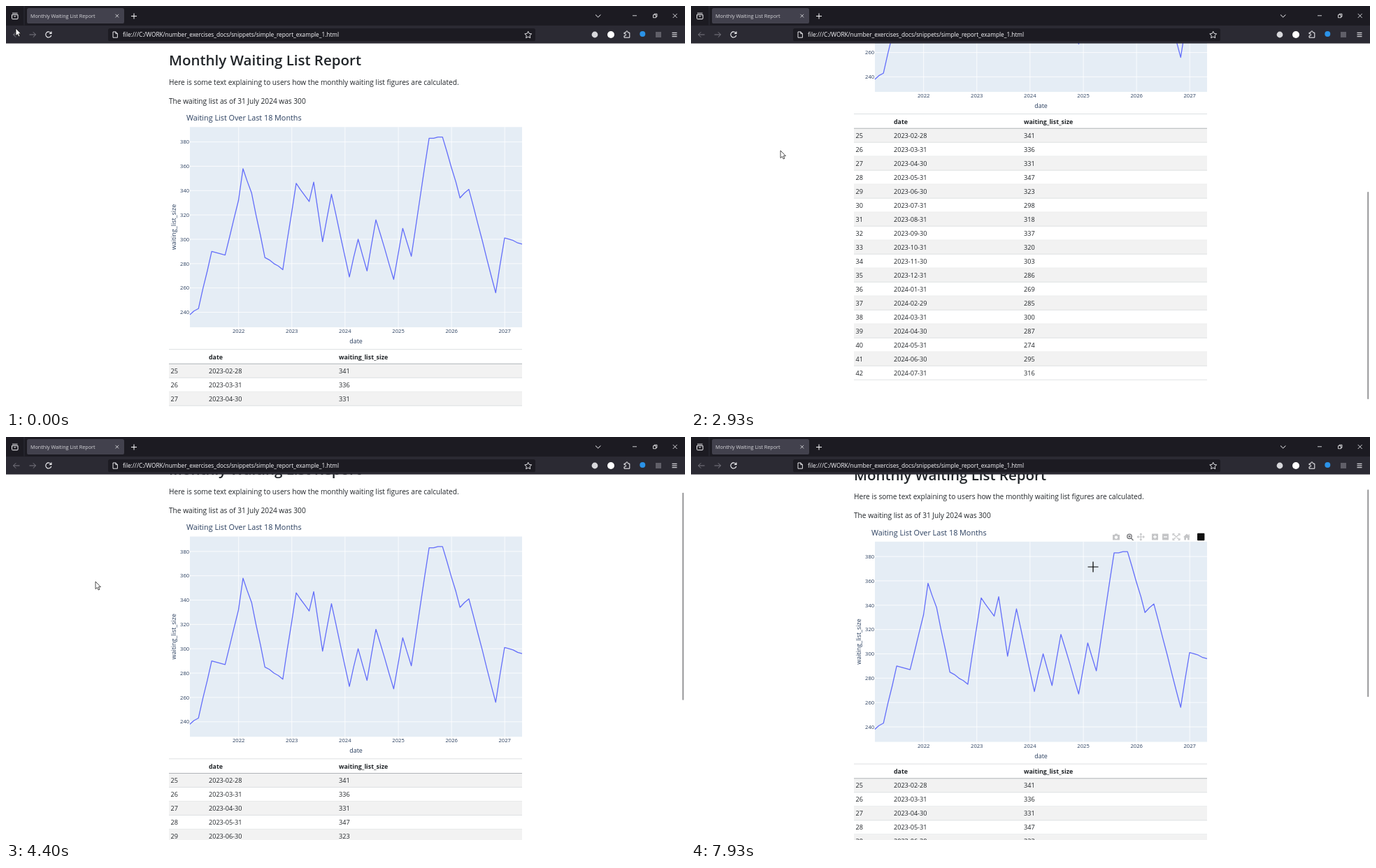
Animation, 971 px wide and 577 px high, one loop 8000 ms. Source, as an HTML page:

```html
<!DOCTYPE html>
<html lang="en">
<head>
<meta charset="utf-8">
<title>Monthly Waiting List Report</title>
<style>
  html, body { margin: 0; height: 100%; overflow: hidden; background: #fff; }
  svg { display: block; width: 971px; height: 577px; }
  text { font-family: "Open Sans", "Noto Sans", sans-serif; }
  #tip text { font-family: "Liberation Sans", Arial, sans-serif; }
</style>
</head>
<body>
<svg id="stage" viewBox="0 0 971 577"></svg>
<script>
const LOOP = 8000, STEP = 1000 / 15, DAY = 864e5, MONTHS = 76, HOVER = 14;
const INK = '#212529', AXIS = '#2a3f5f', BLUE = '#636efa', LIGHT = '#fbfbfe', DIM = '#7c7b84';

// Main turning points of the series: month, size
const turns = [
  [0, 238], [2, 243], [5, 290], [8, 287], [11, 332], [12, 358], [14, 338],
  [17, 285], [21, 275], [24, 346], [27, 331], [28, 347], [30, 298], [32, 337],
  [36, 269], [38, 300], [40, 274], [42, 316], [46, 267], [48, 309], [50, 286],
  [54, 383], [57, 384], [61, 334], [63, 341], [69, 256], [71, 301], [75, 296]];

function sizeAt(month) {
  const next = Math.max(1, turns.findIndex(([m]) => m >= month));
  const [m0, v0] = turns[next - 1], [m1, v1] = turns[next];
  return Math.round(v0 + (v1 - v0) * (month - m0) / (m1 - m0));
}

const monthEnd = i => new Date(Date.UTC(2021, i + 1, 0));
const xOf = date => 332.7 + (date - Date.UTC(2022, 0, 1)) / DAY * 0.20838;
const yOf = v => 438.5 - (v - 240) * 1.742;
const series = Array.from({ length: MONTHS }, (_, i) => {
  const date = monthEnd(i), size = sizeAt(i);
  return { date, size, x: xOf(date), y: yOf(size) };
});

// Wheel scrolls: start, distance, spring rate
const scrolls = [[1518, 195.6, 6.65], [2440, 153.9, 8.4], [3770, -326, 9]];

// Pointer moves: start, end, target x and y
const moves = [
  [800, 1130, 128, 207], [4600, 5200, 333, 246], [5470, 5800, 341, 199],
  [5800, 6330, 418, 321], [6330, 6600, 389, 336], [6600, 7200, 428, 250],
  [7200, 7470, 464.5, 274.5], [7600, 7930, 575, 186]];

const text = (x, y, size, str, fill = INK, extra = '') =>
  `<text x="${x}" y="${y}" font-size="${size}" fill="${fill}" ${extra}>${str}</text>`;
const rect = (x, y, w, h, fill, r = 0) =>
  `<rect x="${x}" y="${y}" width="${w}" height="${h}" rx="${r}" fill="${fill}"/>`;
const dot = (x, y, r, fill) => `<circle cx="${x}" cy="${y}" r="${r}" fill="${fill}"/>`;
const line = (d, stroke, width = 1) =>
  `<path d="${d}" fill="none" stroke="${stroke}" stroke-width="${width}" stroke-linejoin="round"/>`;
const shape = (d, fill) => `<path d="${d}" fill="${fill}" fill-rule="evenodd"/>`;

function chart() {
  let out = text(258, 164, 10.8, 'Waiting List Over Last 18 Months', AXIS)
    + rect(263, 173.3, 475, 286.7, '#e5edf5');
  for (let year = 2022; year <= 2027; year++) {
    const x = xOf(Date.UTC(year, 0, 1));
    out += line(`M${x} 173.3V460`, '#fff', 0.8)
      + text(x, 468, 7.64, year, AXIS, 'text-anchor="middle"');
  }
  for (let v = 240; v <= 380; v += 20) {
    out += line(`M263 ${yOf(v)}H738`, '#fff', 0.8)
      + text(262.2, yOf(v) + 2.8, 7.64, v, AXIS, 'text-anchor="end"');
  }
  return out + line('M' + series.map(p => `${p.x} ${p.y}`).join('L'), BLUE, 1.3)
    + text(500.5, 483, 8.92, 'date', AXIS, 'text-anchor="middle"')
    + text(0, 0, 8.92, 'waiting_list_size', AXIS,
      'text-anchor="middle" transform="translate(243 316.5) rotate(-90)"');
}

function table() {
  const bold = 'font-weight="700"';
  let out = line('M233 491.6H738', '#d5d8db', 0.8)
    + text(290, 505.7, 8.8, 'date', INK, bold)
    + text(476, 505.7, 8.8, 'waiting_list_size', INK, bold);
  for (let i = 25; i <= 42; i++) {
    const y = 512.3 + (i - 25) * 20;
    if (i % 2) out += rect(233, y, 505, 20, '#f2f2f2');
    out += line(`M233 ${y + 20}H738`, '#d9dcdf', 0.8)
      + text(235.5, y + 13.5, 9.1, i)
      + text(290, y + 13.5, 9.1, series[i].date.toISOString().slice(0, 10))
      + text(476, y + 13.5, 9.1, series[i].size);
  }
  return out + line('M233 512.3H738', '#a9adb1', 0.9);
}

function modebar() {
  const grey = '#c4c5c7';
  return shape('M603 163.5h2.5l1-1.5h3l1 1.5h2.5v7.5h-10zM608 165a2.2 2.2 0 1 0 .01 0z', grey)
    + line('M630.2 165.8a3.2 3.2 0 1 1-6.4 0a3.2 3.2 0 1 1 6.4 0M629.3 168.3l3.2 3.2M625.5 165.8h3M627 164.3v3', '#77787b', 1.4)
    + line('M638.5 166.5h9.6M643.3 161.7v9.6M641.8 163.2l1.5-1.5 1.5 1.5M641.8 169.8l1.5 1.5 1.5-1.5M640 165l-1.5 1.5 1.5 1.5M646.6 165l1.5 1.5-1.5 1.5', grey, 1.1)
    + rect(659, 162, 9, 9, grey, 0.6) + line('M661 166.5h5M663.5 164v5', '#fff', 1.4)
    + rect(674, 162, 9, 9, grey, 0.6) + line('M676 166.5h5', '#fff', 1.4)
    + line('M691.5 162h-2.5v2.5M696.5 162h2.5v2.5M691.5 171h-2.5v-2.5M696.5 171h2.5v-2.5M690 163l8 7M698 163l-8 7', grey, 1.2)
    + shape('M704 166.8l5-4.8 2.5 2.4v-1.7h1.3v3l1.2 1.1h-1.3v4.2h-2.7v-3h-2v3h-2.7v-4.2z', grey)
    + rect(724, 161.3, 10.4, 10.4, '#111', 1);
}

function browser() {
  return rect(0, 0, 971, 28, '#1c1b22') + rect(0, 28, 971, 25.6, '#2b2a33')
    + line('M26 0V27.5', '#34333d', 0.8)
    + line('M8.5 12.5h8.5v5.2q0 1-1 1h-6.5q-1 0-1-1zM9 10.3h7.5M11.2 15h3', LIGHT)
    + rect(30, 3, 139, 22, '#42414d', 2.6)
    + text(35, 17, 7.2, 'Monthly Waiting List Report', '#d6d6da')
    + line('M156.5 11.8l4.6 4.6m0-4.6l-4.6 4.6', '#d6d6da', 0.9)
    + line('M179 14.5h8M183 10.5v8M843 12.5l3.7 3.5 3.7-3.5', LIGHT)
    + line('M896 13.8h6M925.5 12.7h4v4h-4zM927 12.5v-1.2h4v4h-1.3M953.7 11l6 6m0-6l-6 6', LIGHT, 0.8)
    + line('M19.5 41h-9m3.7-3.7L10.5 41l3.7 3.7M33.5 41h9m-3.7-3.7l3.7 3.7-3.7 3.7', DIM)
    + line('M64.3 39a4 4 0 1 0 .4 2.8M64.9 36.6v2.9h-3', LIGHT, 1.1)
    + rect(146, 32, 611, 18.3, '#1c1b22', 2.6)
    + line('M153 37h4l2.4 2.4v5.8H153zM156.8 37v2.6h2.6', LIGHT, 0.9)
    + text(167, 44.4, 8.27,
      'file:///C:/WORK/number_exercises_docs/snippets/simple_report_example_1.html', LIGHT)
    + line('M746.7 36.3l1.5 3.1 3.4.5-2.5 2.4.6 3.4-3-1.6-3 1.6.6-3.4-2.5-2.4 3.4-.5z', LIGHT, 0.9)
    + dot(842, 41, 4.4, '#d8d8dc') + dot(865, 41, 5, '#fff')
    + line('M884 45.2v-2.5h1.2a1.4 1.4 0 0 0 0-2.8H884v-1.8h2.5v-.8a1.4 1.4 0 0 1 2.8 0v.8h2.5v7.1z', LIGHT)
    + dot(910.3, 40, 4, '#2b93e8') + rect(929, 37, 8, 8, '#605f68')
    + line('M952.5 38.3h7M952.5 41h7M952.5 43.7h7', LIGHT);
}

document.getElementById('stage').innerHTML = `
  <g id="page">
    ${text(233, 85, 20.5, 'Monthly Waiting List Report', INK, 'font-weight="600"')}
    ${text(233, 112.9, 10.15, 'Here is some text explaining to users how the monthly waiting list figures are calculated.')}
    ${text(233, 139.6, 10.15, 'The waiting list as of 31 July 2024 was 300')}
    ${chart()}${table()}
    <g id="modebar">${modebar()}</g>
    <g id="tip">
      <path d="M0 0L4-4V-12H86V12H4V4Z" fill="${BLUE}" stroke="#fff" stroke-width=".6"/>
      ${text(6, -2.2, 8.28, '', '#fff')}${text(6, 8.3, 8.28, '', '#fff')}
    </g>
  </g>
  <rect id="thumb" x="967.4" width="1.6" height="297" rx=".8" fill="#858587"/>
  ${browser()}
  <path id="arrow" d="M0 0V10.6L2.5 8.4 4.1 12 5.9 11.2 4.3 7.7H7.4Z" fill="#fff" stroke="#000" stroke-width=".7"/>
  <path id="cross" d="M-7.5 0H7.5M0-7.5V7.5" stroke="#000" stroke-width="1.2"/>`;

const [page, bar, tip, thumb, arrow, cross] =
  ['page', 'modebar', 'tip', 'thumb', 'arrow', 'cross'].map(id => document.getElementById(id));
const [tipDate, tipSize] = tip.querySelectorAll('text');
const move = (el, x, y) => el.setAttribute('transform', `translate(${x} ${y})`);
const show = (el, opacity) => el.setAttribute('opacity', Number(opacity));
const progress = (t, start, end) => Math.min(1, Math.max(0, (t - start) / (end - start)));

function scrollAt(t) {
  return scrolls.reduce((sum, [start, distance, rate]) => {
    const x = Math.max(0, t - start) * rate / 1000;
    return sum + distance * (1 - (1 + x) * Math.exp(-x));
  }, 0);
}

function pointerAt(t) {
  return moves.reduce(([x, y], [start, end, toX, toY]) => {
    const u = progress(t, start, end), eased = u * u * (3 - 2 * u);
    return [x + (toX - x) * eased, y + (toY - y) * eased];
  }, [14, 32]);
}

function drawTip(x, y) {
  const distance = p => Math.hypot(p.x - x, p.y - y);
  const nearest = series.reduce((a, b) => distance(b) < distance(a) ? b : a);
  show(tip, distance(nearest) < HOVER);
  move(tip, nearest.x, nearest.y);
  tipDate.textContent = 'date=' + nearest.date.toLocaleString('en-US',
    { month: 'short', year: 'numeric', timeZone: 'UTC' });
  tipSize.textContent = 'waiting_list_size=' + nearest.size;
}

function draw(now) {
  const t = Math.floor((now % LOOP + 4) / STEP) % 120 * STEP + 3.4;
  const scroll = scrollAt(t), [x, y] = pointerAt(t);
  move(page, 0, -scroll);
  thumb.setAttribute('y', 61 + scroll * 0.608);
  show(thumb, t > 866);
  show(bar, progress(t, 4850, 5100));

  const inPlot = x > 263;
  move(inPlot ? cross : arrow, x, y);
  show(cross, inPlot);
  show(arrow, !inPlot);
  drawTip(x, y + scroll);
  requestAnimationFrame(() => draw(performance.now() - origin));
}
const origin = performance.now();
draw(0);
</script>
</body>
</html>
```
